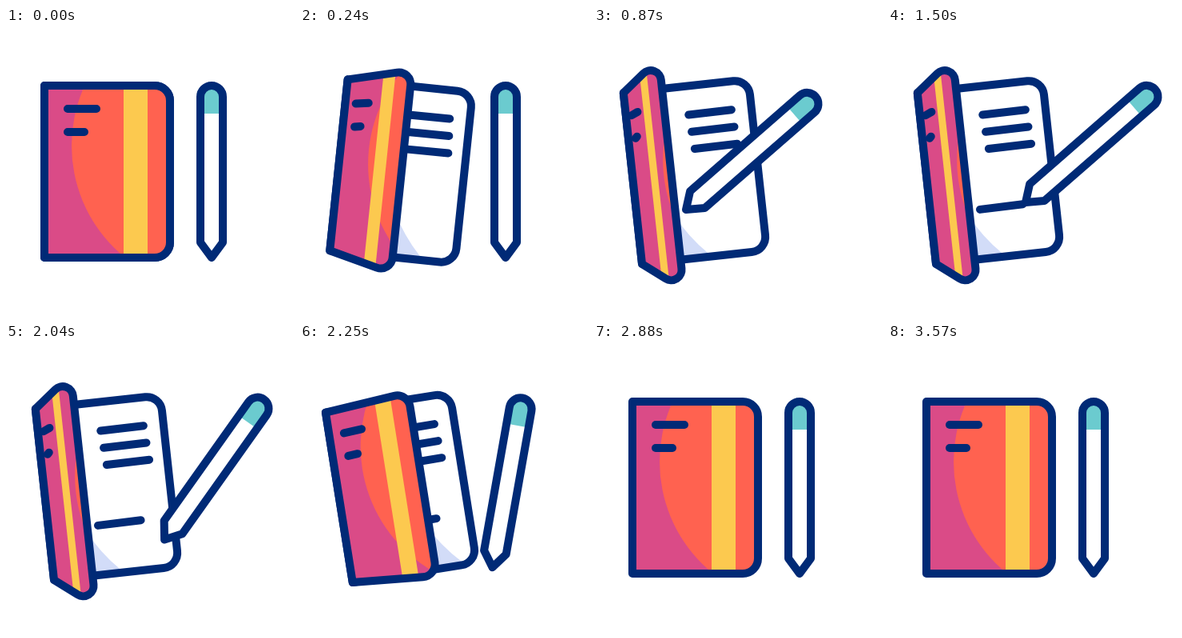
An HTML page with a canvas that plays this animation: 360 by 360 pixels, repeating every 3.6 s.

```html
<!DOCTYPE html>
<html lang="en">
<head>
<meta charset="utf-8">
<title>Notebook and pen</title>
<style>
  html, body { margin: 0; width: 100%; height: 100%; overflow: hidden; background: #fff; }
  canvas { display: block; }
</style>
</head>
<body>
<canvas id="stage" width="360" height="360"></canvas>
<script>
const ctx = document.getElementById('stage').getContext('2d');
const LOOP = 3600;
const NAVY = '#002a76', PINK = '#da4b87', ORANGE = '#ff6250',
      YELLOW = '#fcc94f', TEAL = '#6bcbcf', SHADE = '#d2dcf8';
const LEFT = 48, TOP = 72, RIGHT = 205, BOTTOM = 287;

const mix = (a, b, k) => a + (b - a) * k;

// Eased progress from 0 to 1 between two times.
function ease(t, start, end) {
  const k = Math.min(1, Math.max(0, (t - start) / (end - start)));
  return k * k * (3 - 2 * k);
}

// Follows [time, value] pairs, easing between neighbours.
function track(t, keys) {
  let value = keys[0][1];
  for (let i = 1; i < keys.length; i++) {
    const [start, from] = keys[i - 1], [end, to] = keys[i];
    value += (to - from) * ease(t, start, end);
  }
  return value;
}

function line(x1, y1, x2, y2) {
  ctx.beginPath();
  ctx.moveTo(x1, y1);
  ctx.lineTo(x2, y2);
  ctx.stroke();
}

// Sheet hinged on the left; its right corners spread by `lift`.
function sheet(right, lift, radius) {
  const middle = (TOP + BOTTOM) / 2;
  const path = new Path2D();
  path.moveTo(LEFT, TOP);
  path.arcTo(right, TOP - lift, right, middle, radius);
  path.arcTo(right, BOTTOM + lift, LEFT, BOTTOM, radius);
  path.lineTo(LEFT, BOTTOM);
  path.closePath();
  return path;
}

function drawPage(open, written) {
  const page = sheet(RIGHT, 0, 19);
  ctx.fillStyle = '#fff';
  ctx.fill(page);

  const shift = 105 * (1 - open);
  ctx.fillStyle = SHADE;
  ctx.beginPath();
  ctx.moveTo(95 + shift, 231);
  ctx.quadraticCurveTo(108 + shift, 258, 132 + shift, 283);
  ctx.lineTo(60, 283);
  ctx.lineTo(60, 231);
  ctx.save();
  ctx.clip(page);
  ctx.fill();
  ctx.restore();

  ctx.lineWidth = 10;
  ctx.stroke(page);
  for (let i = 0; i < 3; i++) {
    line(126 + 1.5 * i, 108 + 21.5 * i, 180 + 1.3 * i, 107.5 + 21.5 * i);
  }
  if (written > 0) line(110, 225.3, mix(110, 164, written), 224.5);
}

function drawCover(open) {
  const cover = sheet(mix(RIGHT, 96.5, open), 38 * open * open, mix(19, 13, open));
  ctx.save();
  ctx.clip(cover);
  ctx.fillStyle = PINK;
  ctx.fillRect(0, 0, 360, 360);
  ctx.fillStyle = ORANGE;
  ctx.beginPath();
  ctx.arc(mix(262, 267, open ** 4), mix(147, 180, open ** 4), 180, 0, 2 * Math.PI);
  ctx.fill();
  ctx.fillStyle = YELLOW;
  const width = mix(30, 9, open);
  ctx.fillRect(mix(162, 75, open) - width / 2, 0, width, 360);
  ctx.restore();

  ctx.lineWidth = 10;
  ctx.stroke(cover);
  line(mix(77, 55, open), 101, mix(113, 63, open), 101 - 3.5 * open);
  line(mix(77, 57, open), 130, mix(98, 59, open), 130 - 2 * open);
}

function drawBook(t) {
  const open = track(t, [[0, 0], [370, 1], [2060, 1], [2430, 0]]);
  const tilt = track(t, [[0, 0], [160, 8], [500, -6.2], [2060, -6.2], [2220, -9.2], [2600, 0]]);
  ctx.save();
  ctx.translate(127, 180);
  ctx.rotate(tilt * Math.PI / 180);
  ctx.translate(-127, -180);
  if (open > 0) drawPage(open, t < 2430 ? ease(t, 1080, 1490) : 0);
  drawCover(open);
  ctx.restore();
}

function drawPen(t) {
  const x = track(t, [[0, 257], [400, 257], [850, 115], [1080, 115], [1490, 172], [1820, 172], [2420, 257]]);
  const y = track(t, [[0, 287], [400, 287], [850, 227], [1080, 227], [1490, 218], [1800, 218], [2370, 287]]);
  const angle = track(t, [[400, 0], [850, 48.9], [1840, 48.9], [2420, 0]]);

  // The tip is the origin of the pen.
  const pen = new Path2D();
  pen.moveTo(0, 0);
  pen.lineTo(-14, -19);
  pen.lineTo(-14, -201);
  pen.arc(0, -201, 14, Math.PI, 0);
  pen.lineTo(14, -19);
  pen.closePath();

  ctx.save();
  ctx.translate(x, y);
  ctx.rotate(angle * Math.PI / 180);
  ctx.fillStyle = '#fff';
  ctx.fill(pen);
  ctx.save();
  ctx.clip(pen);
  ctx.fillStyle = TEAL;
  ctx.fillRect(-14, -215, 28, 35);
  ctx.restore();
  ctx.lineWidth = 10;
  ctx.stroke(pen);
  ctx.restore();
}

function draw() {
  const t = performance.now() % LOOP;
  ctx.fillStyle = '#fff';
  ctx.fillRect(0, 0, 360, 360);
  ctx.strokeStyle = NAVY;
  ctx.lineCap = ctx.lineJoin = 'round';
  drawBook(t);
  drawPen(t);
  requestAnimationFrame(draw);
}
draw();
</script>
</body>
</html>
```
